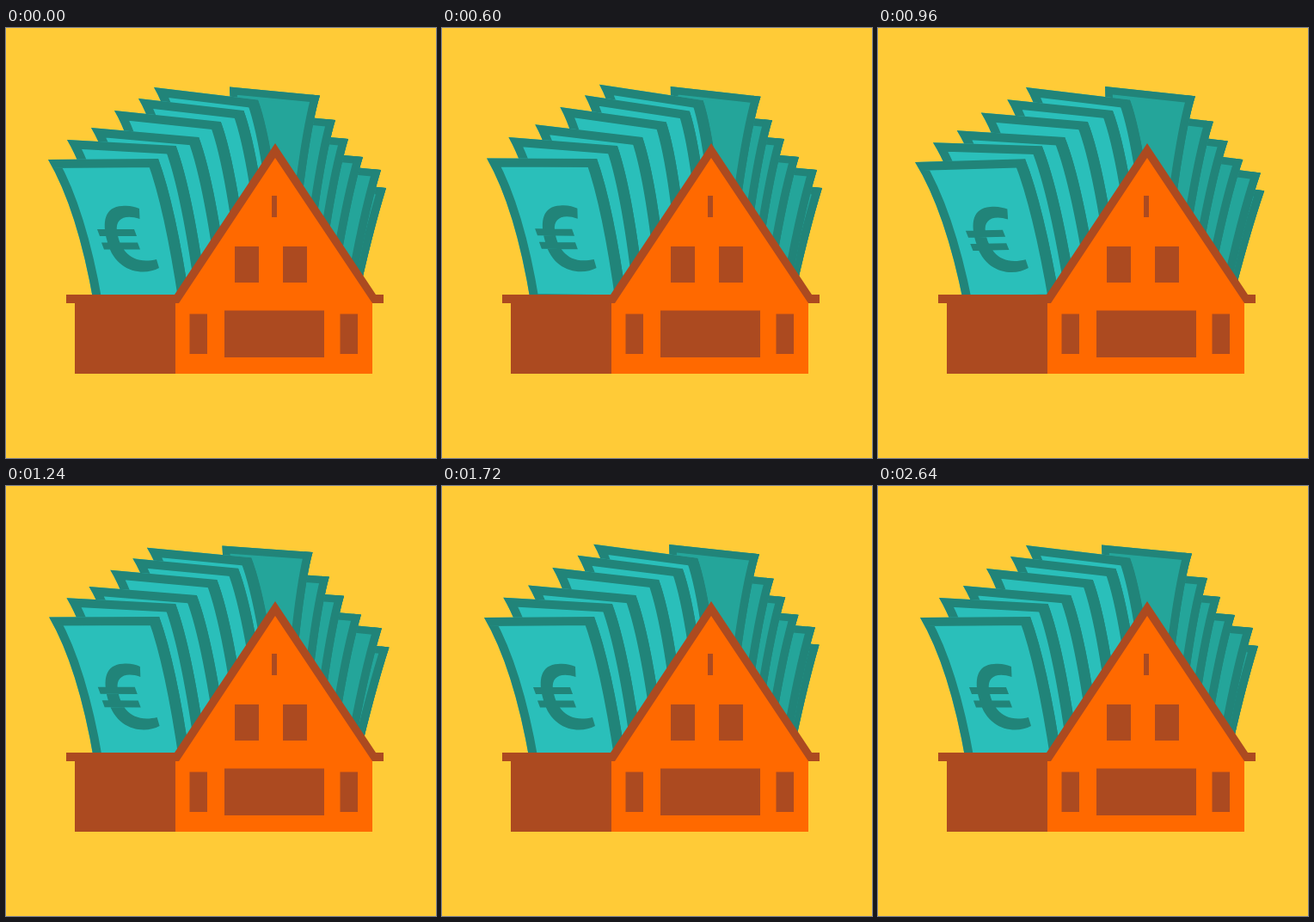
Write an HTML page with a canvas that moves like this. It is 500x500 px and loops after 3000 ms.

```html
<!DOCTYPE html>
<html lang="en">
<head>
<meta charset="utf-8">
<title>House and money</title>
<style>
  html, body { margin: 0; width: 100%; height: 100%; overflow: hidden; background: #ffcb37; }
  canvas { display: block; width: 500px; height: 500px; }
</style>
</head>
<body>
<canvas id="stage" width="500" height="500"></canvas>
<script>
const ctx = document.getElementById('stage').getContext('2d');
const LOOP = 3000, STAGGER = 60, PIVOT_Y = 415, FLOOR = 320;
const BG = '#ffcb37', EDGE = '#218479', FRONT = '#2abfba', BACK = '#24a59a';
const ORANGE = '#ff6900', BROWN = '#ac4a20';

// Visible top corners of the fan: left ones in front, right ones behind
const leftTips = [[49, 153], [71, 130], [99, 116], [126, 96], [154, 82], [172, 69]];
const rightTips = [[365, 78.5], [383, 107], [398, 129], [415, 150], [436, 165], [442, 186]];

function frontNote([x, y], i) {
  const right = x + 128 - 1.4 * i, top = y + 15 - 16 * 0.5 ** i;
  return makeNote(FRONT, 20, 26,
    `M${right} ${top}q20 54 37 ${FLOOR - top}`,
    `H${x + 53}Q${x + 34} ${y + 58} ${x} ${y}Z`);
}

function backNote([x, y]) {
  return makeNote(BACK, 17, 19,
    `M${x} ${y}q-16 52 -34 ${FLOOR - y}`,
    `H${x - 95}L${x - 105} ${y - 10}Z`);
}

function makeNote(color, border, sideBorder, side, rest) {
  return { color, border, sideBorder, side: new Path2D(side), path: new Path2D(side + rest) };
}

const notes = [...leftTips.map(frontNote), ...rightTips.map(backNote)];
const pivotX = i => 345 - 165 * (1 - i / (notes.length - 1)) ** 1.6;

const euro = new Path2D(`M155 210L155.5 222C138 216 127 222 129 236
  C132 258 146 276 175 269L178 279C160 289 127 284 118 249
  C111 225 115 208 135 207C143 206 150 208 155 210Z
  M106 234H149L152 242H109ZM111 249.5H153L156 257.5H114Z`);
const gable = new Path2D('M197 402V318L313 142L426 312V402Z');
const roof = new Path2D('M313 134L430 310H439V320H426L313 151L201 320H70V310H196Z');

const sine = p => (1 - Math.cos(Math.PI * p)) / 2;
const cubic = p => p < .5 ? 4 * p ** 3 : 1 - 4 * (1 - p) ** 3;

// Turning points of one note's sway: time in ms, tilt in radians
const sway = [[100, 0], [390, .036], [875, -.025], [1405, .0125], [1720, 0]];

function tilt(t) {
  const next = sway.findIndex(([time]) => t < time);
  if (next < 1) return 0;
  const [t0, a] = sway[next - 1], [t1, b] = sway[next];
  const ease = next === 1 ? cubic : sine;
  return a + (b - a) * ease((t - t0) / (t1 - t0));
}

function fill(path, color) {
  ctx.fillStyle = color;
  ctx.fill(path);
}

function stroke(path, width) {
  ctx.lineWidth = width;
  ctx.stroke(path);
}

function drawNote(note, i, t) {
  ctx.save();
  ctx.translate(pivotX(i), PIVOT_Y);
  ctx.rotate(tilt(t - i * STAGGER));
  ctx.translate(-pivotX(i), -PIVOT_Y);
  fill(note.path, note.color);
  if (i === 0) fill(euro, EDGE);
  ctx.clip(note.path);
  ctx.strokeStyle = EDGE;
  stroke(note.path, note.border);
  stroke(note.side, note.sideBorder);
  ctx.restore();
}

// Two equal openings, placed symmetrically about a centre line
function windowPair(center, offset, y, w, h) {
  for (const side of [-1, 1]) ctx.fillRect(center + side * offset - w / 2, y, w, h);
}

function drawHouse() {
  fill(gable, ORANGE);
  fill(roof, BROWN);
  ctx.fillRect(80, 315, 117, 87);
  ctx.fillRect(309, 195, 6, 25);
  ctx.fillRect(254, 328.5, 116, 54.5);
  windowPair(308, 28, 254, 28, 42);
  windowPair(311.25, 87.5, 332.5, 20.5, 46.5);
}

function draw(t) {
  ctx.fillStyle = BG;
  ctx.fillRect(0, 0, 500, 500);
  for (let i = notes.length - 1; i >= 0; i--) drawNote(notes[i], i, t);
  drawHouse();
}

function tick() {
  draw(performance.now() % LOOP);
  requestAnimationFrame(tick);
}
tick();
</script>
</body>
</html>
```
